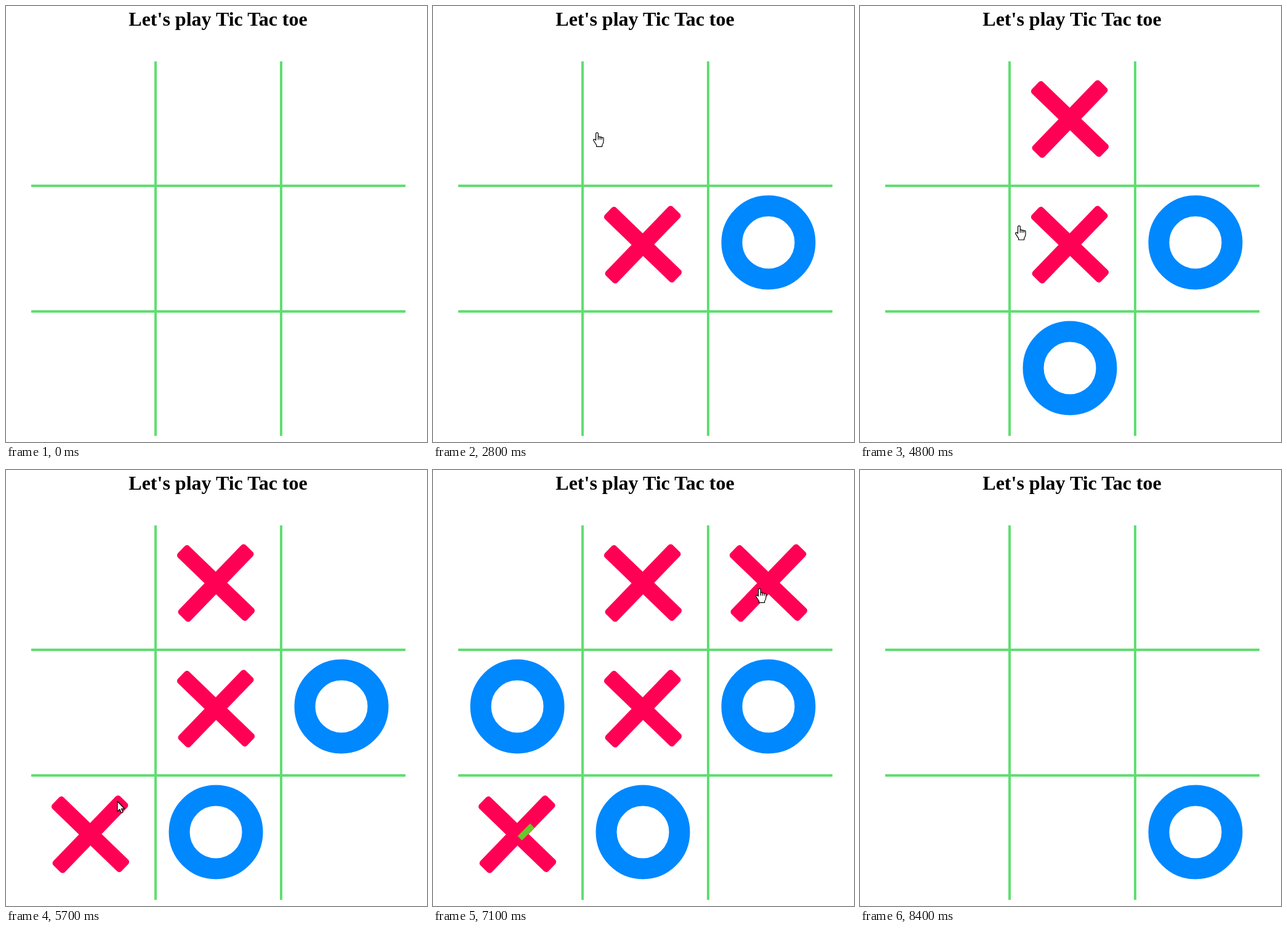
An HTML page for the animation above (8.7 s loop, 684 by 708 pixels).

```html
<!DOCTYPE html>
<html lang="en">
<head>
<meta charset="utf-8">
<title>Tic Tac Toe</title>
<style>
  html, body { margin: 0; width: 100%; height: 100%; overflow: hidden; background: #fff; }
  svg { display: block; }
  text { font: bold 32px "Liberation Serif", "Times New Roman", serif; }
</style>
</head>
<body>
<svg width="684" height="708" viewBox="0 0 684 708">
  <defs>
    <rect id="bar" x="-78" y="-13" width="156" height="26" rx="5"/>
    <g id="cross" fill="#ff0055" transform="translate(0 3.5) rotate(44)">
      <use href="#bar"/>
      <use href="#bar" transform="rotate(-90)"/>
    </g>
    <circle id="ring" r="59.5" fill="none" stroke="#0088ff" stroke-width="34"/>
  </defs>
  <text x="344.5" y="32" text-anchor="middle">Let's play Tic Tac toe</text>
  <path d="M243 90V698M447 90V698M41 292H649M41 496H649" stroke="#5fde71" stroke-width="4"/>
  <g id="marks"></g>
  <path id="strike" stroke="#6ac72c" stroke-width="10"/>
  <g id="pointer" fill="#fff" stroke="#000" stroke-width="1.2" stroke-linejoin="round">
    <g id="hand" transform="translate(-7.3 0)">
      <path d="M6.8.6Q4.9.6 4.9 2.6V13L3.4 11.7Q1 10.8 1 13.2L6 21V23.4H15V21Q17.4 18 17.4 14V9.6Q17 7.8 14.5 8.8 14 7 11.5 8 11 6.4 8.7 7.4V2.6Q8.7.6 6.8.6Z"/>
      <path d="M8.7 7V12M11.6 8V12M14.5 8.6V12" fill="none"/>
    </g>
    <path id="arrow" d="M0 0V16.5L3.8 13 6.3 19 9 18 6.5 12H11.5Z"/>
  </g>
</svg>
<script>
const LOOP = 8700, STEP = 100, CLEAR = 8200, CELL = 204;
const REPLY_DELAY = 1300, TRAVEL = 1100;
const el = id => document.getElementById(id);
const show = (node, on) => node.setAttribute("visibility", on ? "visible" : "hidden");

// Cells count 0 to 8 from the top left; every cross is answered by a ring.
const turns = [
  { cross: 4, ring: 5, at: 1100 },
  { cross: 1, ring: 7, at: 3400 },
  { cross: 6, ring: 3, at: 5400 },
  { cross: 2, ring: 8, at: 7100 }
];

const stops = [
  { at: 0, x: 480, y: 510 },
  { at: 900, x: 368, y: 394 },
  { at: 2800, x: 267, y: 205 },
  { at: 5400, x: 181, y: 538 },
  { at: 6800, x: 531, y: 192 },
  { at: 8400, x: 548, y: 708 }
];

function addMark(shape, cell, from) {
  const node = document.createElementNS("http://www.w3.org/2000/svg", "use");
  node.setAttribute("href", "#" + shape);
  node.setAttribute("x", 137 + CELL * (cell % 3));
  node.setAttribute("y", 180 + CELL * Math.floor(cell / 3));
  el("marks").append(node);
  return { node, from, to: from < CLEAR ? CLEAR : LOOP };
}

const marks = turns.flatMap(({ cross, ring, at }) => [
  addMark("cross", cross, at),
  addMark("ring", ring, at + REPLY_DELAY)
]);

// The pointer rests at each stop, then swings to the next on a curve.
function tipAt(t) {
  const i = stops.findIndex(s => s.at > t);
  if (t < 100 || i < 1) return null;
  const a = stops[i - 1], b = stops[i];
  const p = Math.max(0, 1 - (b.at - t) / TRAVEL);
  return [a.x + (b.x - a.x) * p ** 3, a.y + (b.y - a.y) * p];
}

function draw(t) {
  for (const { node, from, to } of marks) show(node, t >= from && t < to);

  const reach = 2 * CELL * Math.min(1, Math.max(0, (t - 7050) / 1000));
  el("strike").setAttribute("d", `M141 598l${reach} ${-reach}`);
  show(el("strike"), t >= 7100 && t < CLEAR);

  const tip = tipAt(t);
  const isArrow = t >= 5500 && t < 5900;
  if (tip) el("pointer").setAttribute("transform", `translate(${tip})`);
  show(el("hand"), tip && !isArrow);
  show(el("arrow"), tip && isArrow);
}

const start = performance.now();
function tick() {
  const t = (performance.now() - start) % LOOP;
  draw(Math.floor(t / STEP) * STEP);
  requestAnimationFrame(tick);
}
tick();
</script>
</body>
</html>
```
